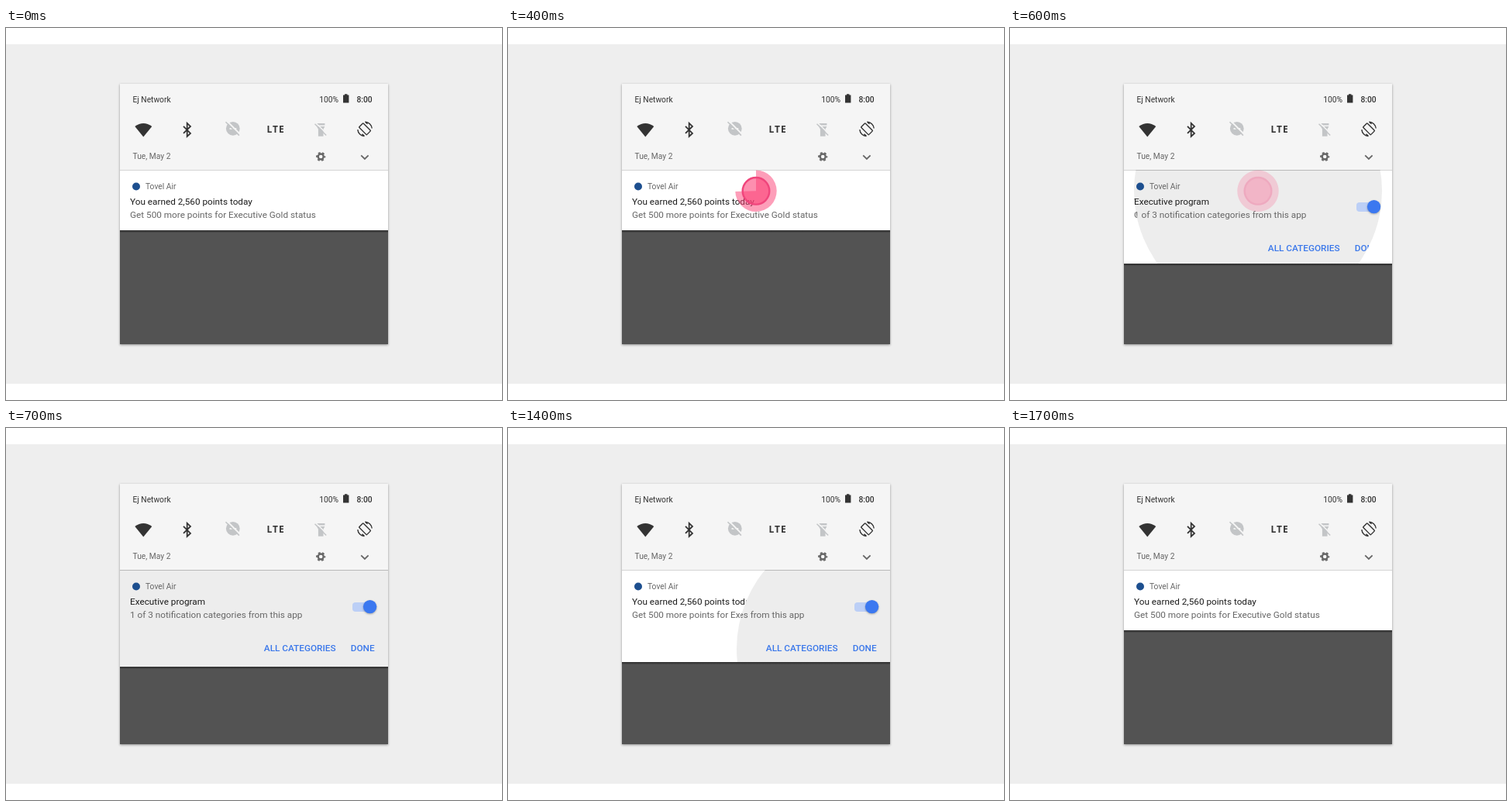
These frames come from a looping animation (640x480 px, 2.4 s). An HTML page:

```html
<!DOCTYPE html>
<html lang="en">
<head>
<meta charset="utf-8">
<title>Notification categories</title>
<style>
  html, body { margin: 0; width: 100%; height: 100%; overflow: hidden; background: #fff; }
  svg { display: block; width: 100vw; height: 100vh; }
  text { font-family: Roboto, sans-serif; font-size: 10.25px; fill: #666; }
  .dark { fill: #333; }
  .big { font-size: 11.78px; }
  .title { fill: #1c1c1c; }
  .bold { font-weight: 500; }
  .blue { fill: #3b78ea; }
  .lte { font: 700 12px "Open Sans", sans-serif; letter-spacing: .9px; }
  .line { fill: none; stroke: #333; }
  .off { fill: #c3c5c7; }
  .panel { filter: drop-shadow(0 1px 1.5px rgba(0, 0, 0, .4)); }
  .thumb { filter: drop-shadow(0 1px 1px rgba(0, 0, 0, .3)); }
</style>
</head>
<body>
<svg viewBox="0 0 640 480">
  <defs>
    <clipPath id="cardClip"><rect id="cardBox" x="147" y="183" width="346" height="78"/></clipPath>
    <clipPath id="revealClip"><circle id="reveal"/></clipPath>
    <linearGradient id="fade" x2="0" y2="1">
      <stop stop-opacity=".5"/><stop offset="1" stop-opacity="0"/>
    </linearGradient>
  </defs>

  <rect y="21" width="640" height="438" fill="#eee"/>
  <rect class="panel" x="147" y="72" width="346" height="336" fill="#535353"/>
  <rect x="147" y="72" width="346" height="111" fill="#f5f5f5"/>

  <!-- status bar -->
  <text class="dark" x="163.5" y="96">Ej Network</text>
  <text class="dark" x="404.3" y="95.5">100%</text>
  <path class="dark" d="M435 86.5h2v-1.3h3.4v1.3h2v10h-7.4z"/>
  <text class="dark bold" x="452.4" y="95.5">8:00</text>

  <!-- quick settings -->
  <path class="dark" d="M177.3 140.6L166.3 127Q177.3 118.8 188.3 127z"/>
  <path class="line" stroke-width="1.8" d="M229 126.9l9 9-4.3 4.1v-17.2l4.3 4.1-9 9"/>
  <circle class="off" cx="292.8" cy="129.8" r="8.9"/>
  <path class="line" style="stroke:#f5f5f5" stroke-width="1.8" d="M288.5 129.8h8.8M284.5 119.5l18 18"/>
  <path class="line" style="stroke:#c3c5c7" stroke-width="1.6" d="M283.5 121.2l17.4 17.4"/>
  <text class="dark lte" x="336.6" y="135.2">LTE</text>
  <path class="off" d="M401 123h10.4v2.6H401zM401 127h10.4l-1.9 3.5v9.3h-6.6v-9.3z"/>
  <path class="line" style="stroke:#f5f5f5" stroke-width="1.6" d="M400 122.7l14 14"/>
  <path class="line" style="stroke:#c3c5c7" stroke-width="1.4" d="M398.5 123.7l14.7 14.7"/>
  <g class="line" stroke-width="1.4" transform="translate(463 130.3)">
    <rect x="-7" y="-3.8" width="14" height="7.6" rx=".8" transform="rotate(45)"/>
    <path id="turn" d="M.5 -9.2A9.2 9.2 0 0 1 9.2 -.8M.5 -9.2l3 2.6"/>
    <use href="#turn" transform="rotate(180)"/>
  </g>

  <text x="163.5" y="169.3">Tue, May 2</text>
  <g class="line" style="stroke:#666">
    <circle cx="406.2" cy="166" r="3.5" stroke-width="2.4"/>
    <circle cx="406.2" cy="166" r="5.2" stroke-width="1.8" stroke-dasharray="2.8 2.645" stroke-dashoffset="1.4"/>
    <path stroke-width="1.8" d="M458.2 164.3l4.7 4.6 4.7-4.6"/>
  </g>

  <!-- notification card -->
  <g clip-path="url(#cardClip)">
    <path fill="#fff" d="M147 183h346v130H147z"/>
    <path fill="#d4d4d4" d="M147 183h346v1H147z"/>
    <text class="big title" x="160" y="228">You earned 2,560 points today</text>
    <text class="big" x="160" y="244.7">Get 500 more points for Executive Gold status</text>
    <g clip-path="url(#revealClip)">
      <path fill="#ededed" d="M147 183h346v130H147z"/>
      <path fill="#b9b9b9" d="M147 183h346v1H147z"/>
      <text class="big title" x="160" y="228">Executive program</text>
      <text class="big" x="160" y="244.7">1 of 3 notification categories from this app</text>
      <rect x="447" y="225" width="26" height="12" rx="4" fill="#bccff6"/>
      <circle class="thumb" cx="469.6" cy="230.6" r="8.7" fill="#3b78f0"/>
      <text class="big bold blue" x="332.8" y="287.6">ALL CATEGORIES</text>
      <text class="big bold blue" x="444.8" y="287.6">DONE</text>
    </g>
    <circle cx="168" cy="204.5" r="5" fill="#1d4f8f"/>
    <text x="180" y="208.2">Tovel Air</text>
  </g>
  <rect id="edge" x="147" width="346" height="3.5" fill="url(#fade)"/>

  <!-- long press -->
  <g id="touch" transform="translate(320 210.3)">
    <path id="pie" fill="#fb3f75" fill-opacity=".5"/>
    <circle r="17.3" fill="#fb3f75" fill-opacity=".58" stroke="#f0457c" stroke-width="2.4"/>
  </g>
</svg>
<script>
const LOOP = 2400, STEP = 100;
const el = id => document.getElementById(id);
const set = (id, attrs) => {
  for (const k in attrs) el(id).setAttribute(k, attrs[k]);
};

// Linear interpolation through [time, value] points
function track(t, points) {
  let [t0, v0] = points[0];
  for (const [t1, v1] of points) {
    if (t < t1) return t <= t0 ? v0 : v0 + (v1 - v0) * (t - t0) / (t1 - t0);
    [t0, v0] = [t1, v1];
  }
  return v0;
}

function piePath(deg) {
  const r = 26.7, a = Math.min(deg, 359.9) * Math.PI / 180;
  return deg > 0
    ? `M0 0V${-r}A${r} ${r} 0 ${+(deg > 180)} 1 ${r * Math.sin(a)} ${-r * Math.cos(a)}z`
    : "";
}

function draw(t) {
  const bottom = track(t, [[400, 261], [500, 262], [600, 304], [700, 308],
    [1300, 308], [1400, 302], [1500, 288.5], [1600, 267], [1700, 261]]);
  const radius = track(t, [[500, 0], [600, 160], [700, 400],
    [1300, 400], [1400, 160], [1500, 39], [1600, 0]]);
  const opening = t < 1000;

  set("cardBox", { height: bottom - 183 });
  set("edge", { y: bottom });
  set("reveal", { cx: opening ? 320 : 455, cy: opening ? 210 : 285, r: radius });
  set("pie", { d: piePath(track(t, [[100, 0], [200, 86], [500, 360]])) });
  set("touch", { opacity: t < 100 ? 0 : track(t, [[500, 1], [600, 0.4], [700, 0]]) });
}

function frame(now) {
  draw(Math.floor(now % LOOP / STEP) * STEP);
  requestAnimationFrame(frame);
}
draw(0);
requestAnimationFrame(frame);
</script>
</body>
</html>
```
